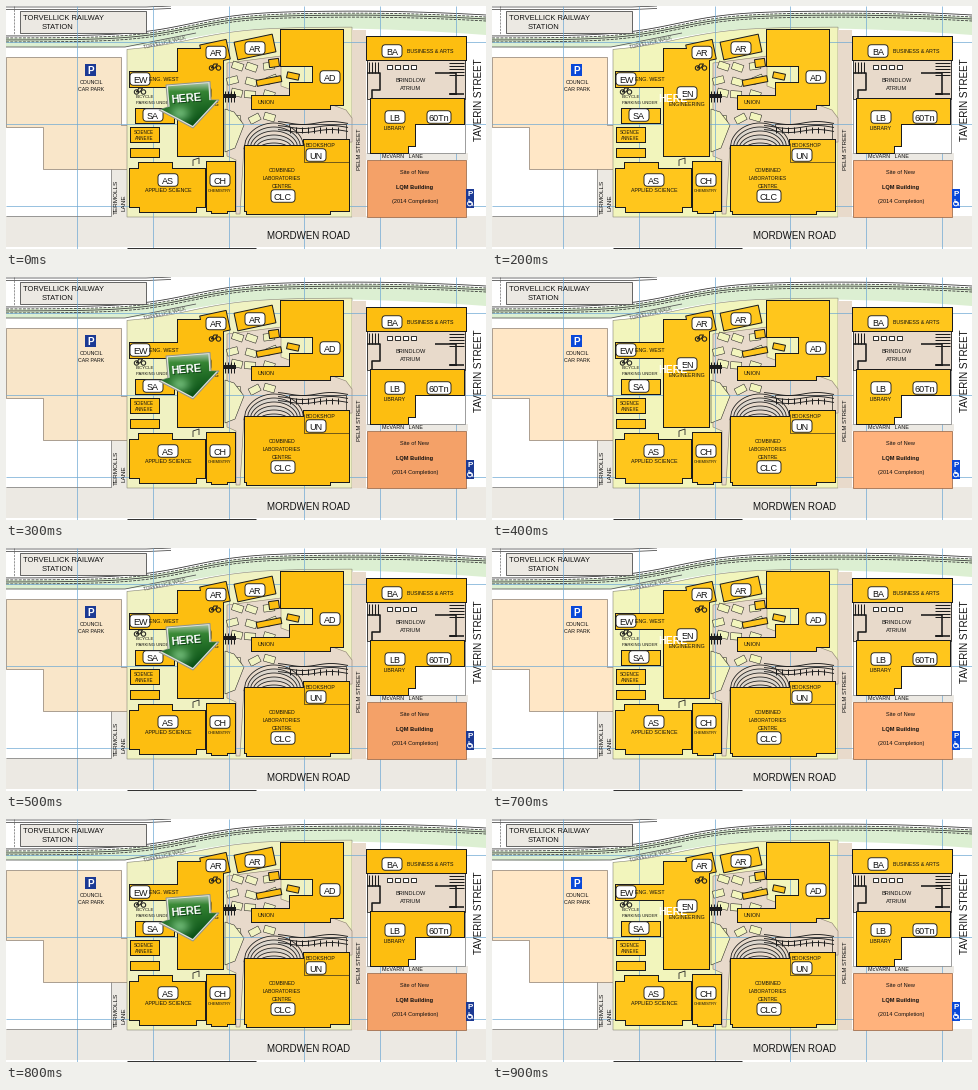
Write a matplotlib script that moves like this. It is 480 px wide and 243 px high and loops after 1000 ms.

```python
import numpy as np
import matplotlib.pyplot as plt
from matplotlib.animation import FuncAnimation
from matplotlib.patches import Circle, FancyBboxPatch, Polygon

W, H, DPI = 480, 243, 96
PX = 72 / DPI
FONT = "Liberation Sans"
INK = "#1c1c1c"
ROAD, PATH = "#ece9e3", "#e8dacb"
VERGE = "#dcefd2"

# role: (colour while the arrow shows, colour while it is hidden)
TINTS = {
    "gold": ("#fdbe10", "#ffc61c"),
    "lawn": ("#f0f2c2", "#f2f5bc"),
    "park": ("#f9e6c9", "#ffe7c6"),
    "site": ("#f4a168", "#ffb27c"),
    "sign": ("#1c3a94", "#0a48d8"),
}

fig = plt.figure(figsize=(W / DPI, H / DPI), dpi=DPI, facecolor="white")
ax = fig.add_axes([0, 0, 1, 1])
ax.set_axis_off()
tinted = []


# --- primitives -----------------------------------------------------------

def poly(points, fill, edge="none", width=1.0, z=2):
    patch = Polygon(points, closed=True, facecolor=TINTS.get(fill, [fill])[0],
                    edgecolor=edge, linewidth=width * PX, joinstyle="miter", zorder=z)
    ax.add_patch(patch)
    if fill in TINTS:
        tinted.append((patch, TINTS[fill]))
    return patch


def rect(x, y, w, h, fill, edge="none", width=1.0, z=2):
    return poly([(x, y), (x + w, y), (x + w, y + h), (x, y + h)], fill, edge, width, z)


def tilted(cx, cy, w, h, degrees, fill="gold", width=1.0, z=4):
    a = np.radians(degrees)
    corners = np.array([(-w, -h), (w, -h), (w, h), (-w, h)]) / 2
    turn = np.array([(np.cos(a), np.sin(a)), (-np.sin(a), np.cos(a))])
    return poly(corners @ turn + (cx, cy), fill, INK, width, z)


def building(*wings):
    """Overlapping rectangles with one common outline."""
    for wing in wings:
        rect(*wing, "gold", INK, 2, 4)
    for wing in wings:
        rect(*wing, "gold", z=4.2)


def line(xs, ys, colour=INK, width=0.8, z=5, style="-"):
    ax.plot(xs, ys, color=colour, lw=width * PX, ls=style, zorder=z,
            solid_capstyle="butt")


def comb(x, y, n, step, length, upright=True):
    for k in range(n):
        if upright:
            line([x + k * step] * 2, [y, y + length], width=1, z=6)
        else:
            line([x, x + length], [y + k * step] * 2, width=1, z=6)


def text(x, y, s, size=5.2, angle=0, ha="center", weight="normal", colour="#111111", z=8):
    return ax.text(x, y, s, fontsize=size * PX, fontname=FONT, rotation=angle,
                   rotation_mode="anchor", ha=ha, va="center_baseline",
                   weight=weight, color=colour, zorder=z)


def stack(x, y, words, size=5.2, step=8, **style):
    for k, word in enumerate(words.split("/")):
        text(x, y + k * step, word, size, **style)


def badge(x, y, code, caption="", size=5.2):
    w, h = (24 if len(code) > 2 else 20), 12.5
    ax.add_patch(FancyBboxPatch(
        (x - w / 2, y - h / 2), w, h, boxstyle="round,pad=0,rounding_size=3.5",
        facecolor="white", edgecolor=INK, linewidth=0.9 * PX, zorder=7))
    text(x, y + 0.3, code, 9)
    text(x, y + 10.5, caption, size)


def bicycle(x, y):
    for side in (-3.5, 3.5):
        ax.add_patch(Circle((x + side, y), 2.2, fill=False, ec=INK, lw=PX, zorder=6))
    line([x - 3.5, x - 1, x + 2.5, x, x - 3.5], [y, y - 4, y - 4, y, y], width=1)


def track(x):
    """Height of the railway curve at x."""
    return 7 + 25 / (1 + np.exp((x - 185) / 30)) + 4 * (np.maximum(x - 340, 0) / 140) ** 2


# --- map ------------------------------------------------------------------

def draw_railway():
    x = np.linspace(0, W, 120)
    edge = track(x) + 9 + 9 * x / W
    poly([*zip(x, track(x)), *zip(x[::-1], edge[::-1])], VERGE, z=0)
    for k in range(4):
        line(x, track(x) + 2 * k - 2, "#333333", 0.8, 2, "--" if k % 2 else "-")
    for k in range(2):
        line([0, 140, 165], [1 + 2.5 * k, 1 + 2.5 * k, 2.5 * k], "#333333", 0.7, 2)
    rect(14, 5, 126, 22, ROAD, "#444444", 0.8)
    line([8, 8], [0, 28], "#555555", 0.6, 3, "--")
    line([0, 119, 190], [41, 41, 27], "#555555", 0.8, 3)


def draw_ground():
    rect(0, 210, W, 31, ROAD, z=0)
    rect(105, 163, 16, 48, ROAD, z=0)
    rect(346, 147, 116, 7, ROAD, z=0)
    line([0, 105, 105], [210, 210, 163], "#777777", 0.7)
    poly([(0, 51), (115, 51), (115, 119), (121, 119), (121, 163),
          (37, 163), (37, 121), (0, 121)], "park", "#8c7e70", 0.7, 1)

    x = np.linspace(121, 346, 40)
    poly([*zip(x, track(x) + 14), (346, 211), (121, 211)], "lawn", "#8a8a7c", 0.6, 1)
    rect(346, 24, 14, 187, PATH, z=1.5)
    poly([(221, 57), (275, 50), (275, 80), (340, 104), (346, 112), (346, 136),
          (238, 140), (234, 208), (230, 208), (230, 154), (221, 150)],
         PATH, "#8c8072", 0.6)

    # lawns between the paths
    rng = np.random.default_rng(4)
    for cx in (229, 246, 263):
        for cy in (60, 74, 88, 112):
            dx, dy, angle = rng.uniform(-3, 3), rng.uniform(-2, 2), rng.uniform(-35, 20)
            tilted(cx + dx, cy + dy, 11, 7, angle, "lawn", 0.5, 3)
    poly([(219, 103), (228, 106), (238, 119), (229, 142), (219, 146)],
         "lawn", INK, 0.5, 3)


def draw_grid():
    for x in np.arange(71, W, 75.8):
        line([x, x], [0, H], "#6fa9d4", 0.7, 3.5)
    for y in np.arange(35.5, H, 82):
        line([0, W], [y, y], "#6fa9d4", 0.7, 3.5)
    line([121, 250], [242, 242], "#333333", 1)


def draw_west():
    building((124, 66, 48, 15))
    building((130, 103, 38, 14))
    building((125, 122, 28, 14))
    building((125, 143, 28, 8))
    building((172, 43, 45, 107))
    building((124, 163, 75, 38), (133, 157, 33, 10), (134, 190, 56, 16))
    building((201, 156, 28, 49), (206, 195, 15, 12))
    tilted(209, 46, 27, 20, -12)
    tilted(249, 41, 39, 18, -12)
    line([187, 187, 193, 193], [160, 154, 152, 158])
    # covered link
    rect(218, 88, 12, 4, INK, z=5)
    comb(219, 85, 4, 3, 11)

    badge(134, 73, "EW")
    text(158, 73, "ENG. WEST")
    badge(147, 109, "SA")
    stack(138, 126, "SCIENCE/ANNEXE", 4.5, 6)
    badge(195, 87, "EN", "ENGINEERING")
    badge(210, 46.5, "AR")
    badge(249, 42, "AR")
    badge(162, 174, "AS", "APPLIED SCIENCE")
    badge(214, 174, "CH", "CHEMISTRY", 4)
    stack(130, 91, "BICYCLE/PARKING UNDER", 4.3, 6, ha="left")
    bicycle(134, 86)
    bicycle(209, 62)


def draw_centre():
    building((275, 24, 62, 36), (307, 24, 30, 75), (284, 77, 40, 26), (246, 90, 50, 13))
    tilted(263, 75, 25, 6, -11)
    tilted(268, 57, 10, 8, -8)
    tilted(287, 70, 12, 6, 12)

    # terrace and sweeping stairs
    x = np.linspace(-1, 1, 40)
    rect(283, 118, 57, 17, PATH, INK, 0.7, 4)
    for k in range(6):
        xs, ys = 268 + (30 - 3 * k) * x, 143 - (26 - 4 * k) * np.sqrt(1 - x ** 2)
        poly([*zip(xs, ys)], "#dcd6cd" if k % 2 else PATH, INK, 0.8, 4)
    for k in range(3):
        xs = np.linspace(272, 342, 30)
        line(xs, 117 + 4 * k + 1.5 * np.sin(xs / 9), width=0.9)
    comb(284, 121, 9, 6, 6)

    building((239, 140, 104, 65), (298, 134, 45, 20), (241, 195, 83, 13))
    line([298, 298, 343], [137, 156, 156], width=0.6)

    badge(324, 71, "AD")
    text(260, 96, "UNION")
    text(315, 139, "BOOKSHOP")
    badge(310, 149, "UN")
    stack(276, 164, "COMBINED/LABORATORIES/CENTRE", 5)
    badge(277, 190, "CLC")


def draw_east():
    rect(361, 54, 98, 93, "white", "#777777", 0.7, 3.6)
    rect(361, 54, 98, 39, PATH, INK, 0.8, 3.7)
    building((361, 31, 99, 23))
    building((365, 93, 44, 47), (365, 93, 37, 54))
    building((409, 93, 49, 25))
    rect(361, 154, 99, 57, "site", "#9d6c4c", 0.8, 3.6)
    # stairwells and lifts
    comb(363, 56, 4, 3, 11)
    comb(443, 57, 5, 3, 15, upright=False)
    line([361, 374, 374, 366, 366], [67, 67, 84, 84, 93], width=1.6)
    line([429, 450, 450, 444, 458], [67, 67, 88, 88, 88], width=1.6)
    for k in range(4):
        rect(381 + 8 * k, 59, 5, 4, "white", INK, 0.9, 5)

    badge(386, 45, "BA")
    text(424, 45, "BUSINESS & ARTS")
    stack(405, 74, "BRINDLOW/ATRIUM", 5.6)
    badge(389, 111, "LB", "LIBRARY")
    badge(433, 111, "60Tn")
    text(409, 166, "Site of New", 5.6)
    text(409, 180.5, "LQM Building", 5.6, weight="bold")
    text(409, 194.5, "(2014 Completion)", 5.6)


def draw_streets():
    text(17, 11.5, "TORVELLICK RAILWAY", 7.5, ha="left")
    text(36, 20.5, "STATION", 7.5, ha="left")
    text(303, 229, "MORDWEN ROAD", 9.7)
    text(472, 94, "TAVERIN STREET", 9.9, 90)
    text(353, 143, "PELM STREET", 6, 90)
    text(110, 191, "TERMOLLS", 6.4, 90)
    text(117, 197, "LANE", 6.4, 90)
    text(376, 150.5, "McVARN   LANE", 5.4, ha="left")
    text(159, 36, "TORVELLICK WALK", 4.6, 13, colour="#444444")
    stack(85, 76, "COUNCIL/CAR PARK", 5.3, 7)

    rect(79, 58, 11, 11.5, "sign", z=6)
    text(84.7, 64.2, "P", 10, weight="bold", colour="white")
    rect(460, 183, 8, 19, "sign", z=6)
    text(464, 188, "P", 8, weight="bold", colour="white")
    ax.add_patch(Circle((463.8, 197.6), 2.2, fill=False, ec="white", lw=PX, zorder=8))
    line([463, 463, 466, 467], [193, 196.5, 196.5, 200], "white", 0.9, 8)


# --- blinking arrow -------------------------------------------------------

def draw_arrow():
    shape = np.array([(160, 79), (204, 75.5), (205, 94), (213, 94),
                      (187, 122), (153, 104), (162, 101)])
    middle = shape.mean(0)
    rim = poly(shape, "#dfe2dd", "#8f958c", 1, 11)
    face = poly(middle + (shape - middle) * 0.92, "none", z=12)
    v, u = np.mgrid[0:1:50j, 0:1:60j]
    shade = np.clip(1.1 * v + 0.2 * u - 0.1, 0, 1)[..., None]
    sheen = np.clip(1 - v / 0.22, 0, 1)[..., None] * 0.75
    glow = 0.3 * np.exp(-((u - 0.35) ** 2 + (v - 0.7) ** 2) / 0.03)[..., None]
    green = (1 - shade) * [0.28, 0.60, 0.25] + shade * [0.03, 0.31, 0.08] + glow
    gloss = ax.imshow(np.clip(green + (0.85 - green) * sheen, 0, 1),
                      extent=(153, 213, 122, 75), aspect="auto", zorder=12)
    gloss.set_clip_path(face)
    words = [text(180 + d, 92 + d, "HERE", 11, 5, weight="bold", colour=c, z=14 - d)
             for d, c in ((0.8, "#14451a"), (0, "white"))]
    return [rim, face, gloss, *words]


for draw in (draw_railway, draw_ground, draw_grid, draw_west, draw_centre,
             draw_east, draw_streets):
    draw()
arrow = draw_arrow()
ghost = text(181, 91.5, "HERE", 10.5, weight="bold", colour="white", z=10)
ax.set_xlim(0, W)
ax.set_ylim(H, 0)

TICKS = 10


def update(i):
    # each half second starts lit; the first one blinks twice
    beat = i % 5
    shown = beat in (0, 1, 3)
    for part in arrow:
        part.set_visible(shown)
    ghost.set_visible(not shown)
    for patch, (lit, plain) in tinted:
        patch.set_facecolor(lit if shown else plain)
    return arrow


anim = FuncAnimation(fig, update, frames=TICKS, interval=100, repeat=True)
plt.show()
```
